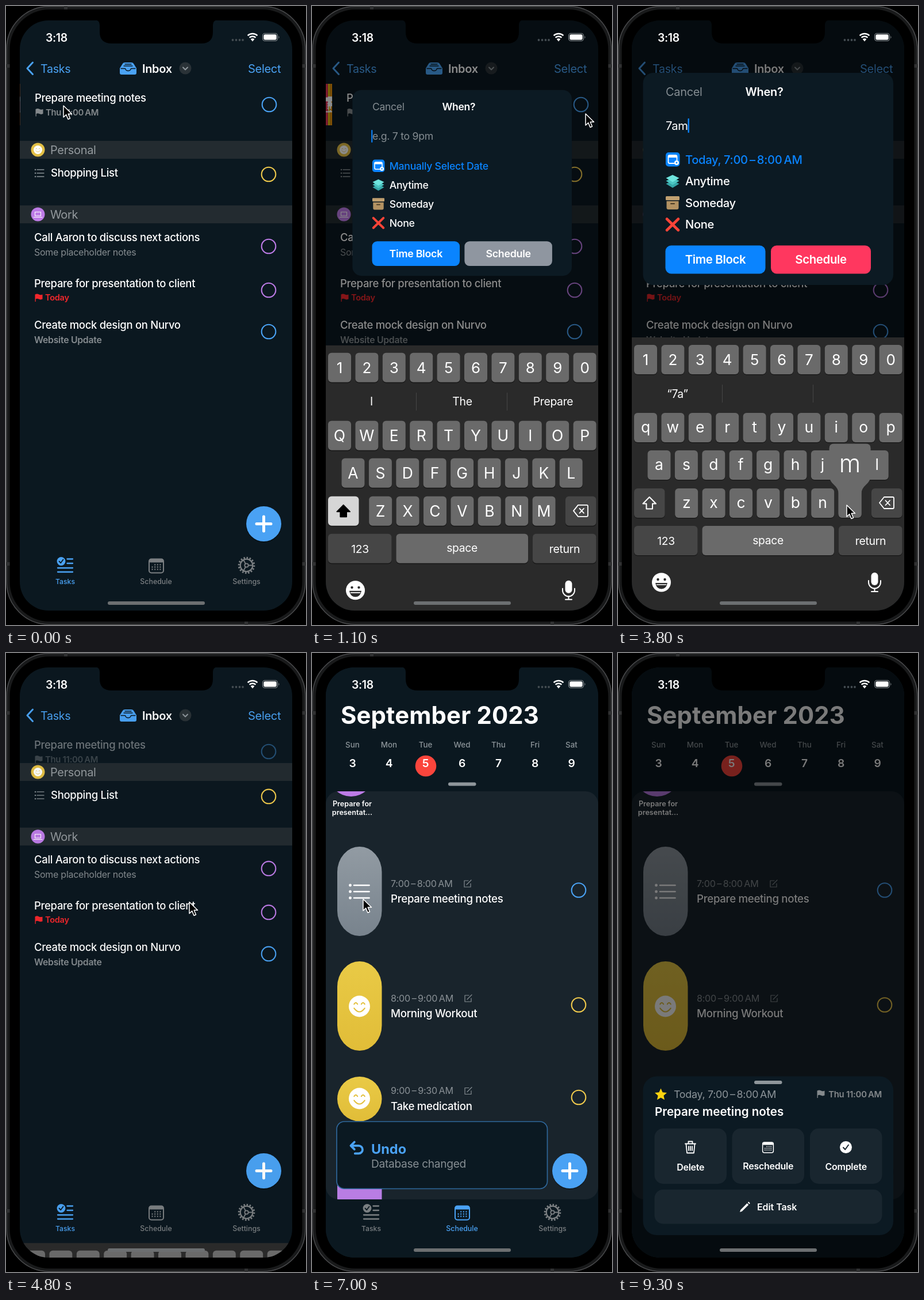
An HTML page for the animation above (9.8 s loop, 522 by 1074 pixels).

```html
<!DOCTYPE html>
<html lang="en">
<head>
<meta charset="utf-8">
<title>Scheduling a task</title>
<style>
html, body { margin: 0; width: 100%; height: 100%; overflow: hidden; background: #000; }
svg { display: block; width: 100vw; height: 100vh; }
text { font-family: Inter, "Open Sans", sans-serif; white-space: pre; }
</style>
</head>
<body>
<svg id="stage" viewBox="0 0 522 1074"></svg>
<script>
const LOOP = 9800;
const BG = '#0b1820', BLUE = '#4aa2f4', IOS = '#0a84ff', YELLOW = '#f0ca4c', PURPLE = '#bd7be6',
  RED = '#f3272c', DIM = '#7b7f82';

// Text is placed by the middle of its capital letters.
const T = (x, y, s, size, fill = '#fff', weight = 400, anchor = 'start', ls = -.017, id = '') =>
  `<text ${id && `id="${id}"`} x="${x}" y="${(y + size * .364).toFixed(2)}" font-size="${size}" fill="${fill}" font-weight="${weight}" text-anchor="${anchor}" letter-spacing="${(ls * size).toFixed(2)}">${s}</text>`;
const R = (x, y, w, h, r, fill, more = '') =>
  `<rect x="${x}" y="${y}" width="${w}" height="${h}" rx="${r}" fill="${fill}" ${more}/>`;
const C = (x, y, r, fill, more = '') => `<circle cx="${x}" cy="${y}" r="${r}" fill="${fill}" ${more}/>`;
const L = (d, color, w = 2, more = '') =>
  `<path d="${d}" fill="none" stroke="${color}" stroke-width="${w}" stroke-linecap="round" stroke-linejoin="round" ${more}/>`;
const P = (d, fill) => `<path d="${d}" fill="${fill}"/>`;
const G = (id, s, more = '') => `<g id="${id}" ${more}>${s}</g>`;
const at = (x, y, s, k = 1) => `<g transform="translate(${x} ${y}) scale(${k})">${s}</g>`;

const ring = (x, y, color) => C(x, y, 12.3, 'none', `stroke="${color}" stroke-width="2.1"`);
const flag = (x, y, color) => at(x, y, P('M-6.5-5.5Q-3-7.5 0-5.8T6.5-5.5V2.6Q3 4.2 0 2.6T-5.2 2.6V7H-6.5Z', color));
const bullets = (x, y, w, gap, color, sw) => [-1, 0, 1].map(i =>
  C(x, y + i * gap, sw * .9, color) + L(`M${x + w * .2} ${y + i * gap}H${x + w}`, color, sw)).join('');
const smiley = (x, y, r, ink) => at(x, y, C(0, 0, 1, '#fff') +
  L('M-.5-.2Q-.34-.48-.18-.2M.18-.2Q.34-.48.5-.2M-.5.18Q0 .85.5.18', ink, .11), r);
const calendar = color => {
  let dots = '';
  for (let n = 1; n < 12; n++) dots += C((n % 4) * 4.6 - 6.9, Math.floor(n / 4) * 4 - 1.5, 1.15, color);
  return R(-12.5, -11.5, 25, 24, 4, 'none', `stroke="${color}" stroke-width="2"`) + R(-12.5, -11.5, 25, 6, 2, color) + dots;
};
const undo = L('M-4-10L-10-4L-4 2M-10-4H3A6.5 6.5 0 0 1 3 9H-3', BLUE, 3.6);
const pencil = color => P('M-9 9L-7.8 5.2L3.6-6.2L6.2-3.6L-5.2 7.8ZM4.8-7.4L6.3-8.9L8.9-6.3L7.4-4.8Z', color);

const frame = R(0, 0, 522, 1074, 0, '#000') +
  R(1, .8, 520, 1072.4, 74, '#191a1b', 'stroke="#4a4b4d" stroke-width="1.5"') +
  R(6.5, 6, 509, 1062, 69, '#000') +
  [104, 968].map(y => R(0, y - 3, 6.5, 6, 0, '#303132') + R(515.5, y - 3, 6.5, 6, 0, '#303132')).join('') +
  R(101, 0, 6, 6, 0, '#303132') + R(415, 1068, 6, 6, 0, '#303132');

const statusBar = P('M155 24Q163 25 163 33V45Q163 65 184 65H340Q360 65 360 45V33Q360 25 368 24Z', '#000') +
  T(69, 54.5, '3:18', 19.4, '#fff', 600) +
  [394.5, 400.5, 406.5, 412].map(x => C(x, 59, 1.9, '#454d52')).join('') +
  P('M429 61.5L425.7 57.6A5 5 0 0 1 432.3 57.6Z', '#fff') +
  L('M423.6 54.8A8 8 0 0 1 434.4 54.8M420.6 51.3A12.4 12.4 0 0 1 437.4 51.3', '#fff', 2.5, 'style="stroke-linecap:butt"') +
  R(446.5, 47.5, 26, 13, 4, 'none', 'stroke="#8a9094" stroke-width="1.1"') +
  R(448.3, 49.3, 22.4, 9.4, 2.6, '#fff') + P('M474.5 52Q476.5 54 474.5 56.5Z', '#8a9094');

// Inbox
const band = (y, name, icon, color) => R(24, y, 474, 31, 0, '#232b30') + C(55.5, y + 15.5, 12, color) + icon +
  T(77, y + 16, name, 20, '#949a9e');
const task = (y, name, sub) => T(49, y, name, 18.5, '#fff', 500) + sub;
const inboxHead = L('M46.5 98L37 108.3L46.5 118.5', BLUE, 3) + T(60, 108.5, 'Tasks', 19.7, BLUE) +
  P('M198 108L203 100Q204 98 207 98H218Q221 98 222 100L227 108V116Q227 119 224 119H201Q198 119 198 116Z', BLUE) +
  L('M200 108.5H207.5Q208.5 112.5 212.5 112.5T217.5 108.5H225M205 104H220M207 101H218', BG, 1.3) +
  T(237, 108.5, 'Inbox', 20, '#fff', 600) + C(312, 108, 10.5, '#2a3237') + L('M308 106.5L312 110.5L316 106.5', '#8f979c', 2) +
  T(421, 108.5, 'Select', 20.1, BLUE);
const firstRow = G('buttons',
  `<rect id="b2" y="135" height="72" fill="#e58e0a"/><rect id="b1" y="135" height="72" fill="#e5c00c"/>` +
  G('i2', L('M0 160V176', '#fff', 2) + C(0, 182, 1.4, '#fff')) +
  G('i1', P('M-7 157H7L5 160V167Q9 170 10 174H1L0 186L-1 174H-10Q-9 170-5 167V160Z', '#fff')) +
  `<rect id="b0" x="24" y="135" height="72" fill="#e53156"/>` +
  G('i0', at(0, 171, calendar('#fff')))) +
  G('row', R(24, 135, 474, 72, 0, BG) + task(159, 'Prepare meeting notes',
    flag(57, 184.5, '#84898c') + T(68, 184.7, 'Thu 11:00\u2009AM', 14.8, '#84898c', 600)) + ring(457, 171, BLUE));
const rest = band(234, 'Personal', smiley(55.5, 249.5, 7.5, '#e3bf45'), '#e3bf45') +
  bullets(51, 290, 15, 6, '#8b9297', 1.3) + T(78, 289, 'Shopping List', 18.5, '#fff', 500) + ring(457, 292, YELLOW) +
  band(346, 'Work', L('M50.5 357.5H60.5V364H50.5ZM48 366.5H63', '#fff', 1.1), PURPLE) +
  task(401, 'Call Aaron to discuss next actions', T(49, 427, 'Some placeholder notes', 16, '#868c90')) + ring(457, 417, PURPLE) +
  task(481, 'Prepare for presentation to client', flag(57, 506, RED) + T(68, 506, 'Today', 14.5, RED, 600)) + ring(457, 493, PURPLE) +
  task(553, 'Create mock design on Nurvo', T(49, 579, 'Website Update', 15.8, '#868c90', 600)) + ring(457, 565, BLUE);
const inbox = G('inbox', inboxHead + G('first', firstRow) + G('rest', rest));

// Schedule
const edit = (x, y) => L(`M${x + 1} ${y - 5}H${x - 6}V${y + 6}H${x + 5}V${y}M${x - 2} ${y + 2}L${x + 6} ${y - 6}`, '#858d92', 1.2);
const slot = (y, h, fill, icon, ty, time, name, color) => R(44, y, 77.5, h, 38.7, fill, 'ry="44"') + icon +
  T(137, ty, time, 16.2, '#8a9196') + edit(time[0] === '7' ? 271 : 272, ty) +
  T(137, ty + 26.5, name, 18.7, '#fff', 500) + ring(464, ty + 11.5, color);
const days = ['Sun', 'Mon', 'Tue', 'Wed', 'Thu', 'Fri', 'Sat'].map((d, i) => {
  const x = 70.5 + i * 63.5;
  return (i === 2 ? C(x + .5, 196, 18.3, '#fb453c') : '') + T(x, 159.5, d, 13.4, '#8c9499', 500, 'middle', 0) +
    T(x, 191, i + 3, 19.3, '#fff', 600, 'middle');
}).join('');
const schedule = G('schedule', R(24, 25, 474, 1024, 0, BG) + T(50, 108, 'September 2023', 41.8, '#fff', 700, 'start', .004) + days +
  R(237, 224.5, 48.5, 6, 3, '#8f969b') + R(24, 240, 474, 708, 22, '#19242c') +
  `<g clip-path="url(#panel)">` + C(68, 210, 39, PURPLE) +
  T(70, 261.5, 'Prepare for', 12.6, '#fff', 600, 'middle', 0) + T(70, 276, 'presentat…', 12.6, '#fff', 600, 'middle', 0) +
  slot(336, 155, 'url(#slate)', bullets(66.5, 414, 33, 11, '#fff', 2.7), 400, '7:00\u2009–\u20098:00\u2009AM', 'Prepare meeting notes', BLUE) +
  slot(535, 155, 'url(#gold)', smiley(82.5, 613, 18.5, '#e3c03c'), 599, '8:00\u2009–\u20099:00\u2009AM', 'Morning Workout', YELLOW) +
  slot(735, 77.5, 'url(#gold)', smiley(82.5, 773, 18.5, '#e3c03c'), 759.5, '9:00\u2009–\u20099:30\u2009AM', 'Take medication', YELLOW) +
  R(44, 856, 77.5, 155, 38.7, '#b97de4') + '</g>');

const tabs = G('tabTasks', C(96, 963.5, 7.4, 'currentColor') + L('M92.5 963.5L95.3 966.3L99.5 960.5', BG, 1.8) +
    L('M106.5 959.5H116M106.5 967H116M90 975H116M90 982H116', 'currentColor', 2.3) +
    T(103, 998.5, 'Tasks', 12.2, 'currentColor', 500, 'middle', 0)) +
  G('tabPlan', at(261.5, 971, calendar('currentColor')) + T(261, 998.5, 'Schedule', 12.4, 'currentColor', 500, 'middle', 0)) +
  `<g color="${DIM}">` + C(418.5, 970.5, 13.3, 'none', 'stroke="currentColor" stroke-width="3" pathLength="32" stroke-dasharray="1 1"') +
  C(418.5, 970.5, 10.8, 'none', 'stroke="currentColor" stroke-width="2.2"') + C(418.5, 970.5, 3.2, 'none', 'stroke="currentColor" stroke-width="1.8"') +
  L('M421.7 970.5H429M416.9 967.7L413.3 961.4M416.9 973.3L413.3 979.6', 'currentColor', 1.8) +
  T(418.5, 998.5, 'Settings', 12.4, 'currentColor', 500, 'middle', 0) + '</g>';
const plus = C(448.5, 900, 31, '#000', 'opacity=".25"') + C(448.5, 898.5, 30.5, BLUE) + L('M436 898.5H461M448.5 886V911', '#fff', 5);
const toast = G('toast', R(43, 813, 366.5, 116.5, 13, '#0b1922', 'stroke="#2e679b" stroke-width="1.7"') +
  at(78, 859, undo, 1.05) + T(103, 860, 'Undo', 23.5, BLUE, 700, 'start', 0) + T(103, 886, 'Database changed', 19.2, '#868e93'));

// Time picker
const option = (y, name, icon) => icon + T(117, y, name, 20.2, '#fff', 500);
const picker = G('picker', R(43.5, 116, 435.5, 368, 18, '#0c1a23') + T(83, 148.5, 'Cancel', 20, '#858d92') + T(254.5, 148.5, 'When?', 20, '#fff', 600, 'middle') +
  T(83, 207.5, '', 20.2, '#fff', 400, 'start', -.017, 'entry') + R(81, 195, 2.4, 25, 1, IOS, 'id="caret"') +
  R(83, 254, 24.5, 24.5, 5, IOS) + R(87.5, 259, 15, 14, 2.5, 'none', 'stroke="#fff" stroke-width="1.8"') + R(87.5, 259, 15, 4, 1, '#fff') + C(102, 272, 4, '#fff') + C(102, 272, 1.4, IOS) +
  T(117, 266.5, '', 20.2, IOS, 500, 'start', -.017, 'date') +
  option(304, 'Anytime', ['#35a7a8', '#4cc5c2', '#6ee4dd'].map((c, i) => P(`M95 ${303 - i * 5}L106.5 ${308.5 - i * 5}L95 ${315.5 - i * 5}L83.5 ${308.5 - i * 5}Z`, c)).join('')) +
  option(341.5, 'Someday', R(83, 330, 24, 7, 1.5, '#c0a070') + P('M84.5 338.5H105.5V350Q105.5 353 102.5 353H87.5Q84.5 353 84.5 350Z', '#b39262') + L('M92 343H98', '#4a3b24', 2)) +
  option(379, 'None', L('M85 369.5L105 389M105 369.5L85 389', '#fb4438', 4.6)) +
  R(82.5, 415.5, 174, 49, 10, IOS) + T(169.5, 440, 'Time Block', 20.4, '#fff', 600, 'middle') +
  R(266, 415.5, 174, 49, 10, '#8f96a0', 'id="confirm"') + T(353, 440, 'Schedule', 20.4, '#fff', 600, 'middle'));

// Keyboard
const PITCH = 47.4;
const cap = (x, y, w, fill = '#6a6a6a') => R(x, y + 1.3, w, 51, 6, '#171717') + R(x, y, w, 51, 6, fill);
const rows = [['1234567890', 28, 588], ['QWERTYUIOP', 28, 706], ['ASDFGHJKL', 51.5, 771], ['ZXCVBNM', 99.2, 837]];
const eachKey = f => rows.map(([s, x, y]) => [...s].map((c, i) => f(c, x + i * PITCH, y)).join('')).join('');
const letters = (id, f, dy) => G(id, eachKey((c, x, y) => y > 600 ? T(x + 20, y + 26 + dy, f(c), 26.5, '#fff', 400, 'middle', 0) : ''));
const keyboard = G('keyboard', R(24, 575, 474, 474, 0, '#2a2a2a') +
  eachKey((c, x, y) => cap(x, y, 40) + (y < 600 ? T(x + 20, y + 26, c, 26, '#fff', 400, 'middle', 0) : '')) +
  letters('upper', c => c, 0) + letters('lower', c => c.toLowerCase(), -2) +
  R(181, 657, 1, 31, 0, '#454545') + R(339, 657, 1, 31, 0, '#454545') +
  [103.5, 261.5, 419.5].map((x, i) => T(x, 672.5, '', 19.4, '#fff', 400, 'middle', -.017, 'hint' + i)).join('') +
  R(28, 838.3, 53.5, 51, 6, '#171717') + R(28, 837, 53.5, 51, 6, '#464646', 'id="shift"') +
  L('M54.7 852L66 863.5H60V872.5H49.4V863.5H43.4Z', '#fff', 2, 'id="arrow"') + cap(441, 837, 53.5, '#464646') +
  L('M463 852H478Q480 852 480 854V870Q480 872 478 872H463L455 862ZM465.5 858L473 866M473 858L465.5 866', '#fff', 1.8) +
  cap(28, 902, 110.5, '#464646') + cap(146.5, 902, 229.5) + cap(384, 902, 110.5, '#464646') +
  T(83.5, 928, '123', 19.3, '#fff', 400, 'middle') + T(261, 926.5, 'space', 19.3, '#fff', 400, 'middle') + T(439.5, 928, 'return', 19.5, '#fff', 400, 'middle') +
  C(75.5, 1000, 16.5, '#fff') + C(69.5, 995, 2.2, '#2a2a2a') + C(81.5, 995, 2.2, '#2a2a2a') + P('M65 1001H86Q84 1011.5 75.5 1011.5T65 1001Z', '#2a2a2a') + L('M67.5 1004H83.5', '#fff', 1.6) +
  R(440.5, 983, 12, 22, 6, '#fff') + L('M436 997V1000A10.5 10.5 0 0 0 457 1000V997M446.5 1011V1016M441 1016H452', '#fff', 2) +
  G('callout', P('M-28-78H28Q36-78 36-70V-22Q36-14 28-7Q20 0 20 8V43Q20 50 14 50H-14Q-20 50-20 43V8Q-20 0-28-7Q-36-14-36-22V-70Q-36-78-28-78Z', '#6a6a6a') +
    T(0, -44, '', 43, '#fff', 300, 'middle', 0, 'calloutText')));

// Task sheet
const tile = (x, name, y) => R(x, 825, 125.5, 96, 15, '#19262f') + T(x + 62.7, y, name, 16, '#fff', 600, 'middle');
const sheet = G('sheet', R(43.5, 734.5, 435.5, 275.5, 24, '#0c1a23') + R(237, 742, 48.5, 6, 3, '#8f969b') +
  P('M74.5 755.5L77.6 762.3L85 763L79.4 768L81 775.3L74.5 771.5L68 775.3L69.6 768L64 763L71.4 762.3Z', '#fdd30f') +
  T(97, 765.5, 'Today, 7:00\u2009–\u20098:00\u2009AM', 17.9, '#8d959a') + flag(353, 765, '#84898c') + T(459, 765.3, 'Thu 11:00\u2009AM', 14.9, '#84898c', 600, 'end') +
  T(64, 795, 'Prepare meeting notes', 20.6, '#fff', 600, 'start', -.002) +
  tile(63.5, 'Delete', 892) + tile(198.5, 'Reschedule', 890) + tile(334, 'Complete', 891) +
  L('M117 851.5H135M122.5 851V847.5H129.5V851M118.5 852L120 867.5H132L133.5 852M123 856V863M126 856V863M129 856V863', '#fff', 1.8) +
  at(261, 857.5, calendar('#fff'), .75) + C(396.5, 857.5, 10.5, '#fff') + L('M392 858L395.3 861.5L401 853.5', '#19262f', 2) +
  R(63.5, 931, 396, 59.5, 15, '#19262f') + at(221, 961, pencil('#fff')) + T(242, 961, 'Edit Task', 16, '#fff', 600, 'start', -.005));

const grad = (id, a, b) => `<linearGradient id="${id}" x2="0" y2="1"><stop stop-color="${a}"/><stop offset="1" stop-color="${b}"/></linearGradient>`;
document.getElementById('stage').innerHTML =
  `<defs>${grad('slate', '#929ba3', '#78838d')}${grad('gold', '#e9ca46', '#e1bd38')}` +
  `<clipPath id="screen">${R(24, 25, 474, 1024, 50, '#000')}</clipPath><clipPath id="panel">${R(24, 240, 474, 708, 22, '#000')}</clipPath></defs>` +
  frame + `<g clip-path="url(#screen)">` + R(24, 25, 474, 1024, 0, BG) + inbox + schedule + tabs + toast + plus +
  R(24, 1032, 474, 17, 0, '#000', 'id="gap"') +
  R(24, 25, 474, 1024, 0, '#000', 'id="shade"') + picker + keyboard + sheet + '</g>' + statusBar +
  R(177, 1033, 169, 6, 3, '#6c6f71') +
  G('cursor', `<path d="M0 0V20L4.7 15.6L8 23.5L11.5 22L8.2 14.2H14.5Z" fill="#000" stroke="#fff" stroke-width="1.5" stroke-linejoin="round"/>`);

const el = {};
document.querySelectorAll('[id]').forEach(e => el[e.id] = e);
const set = (id, a) => { for (const k in a) el[id].setAttribute(k, a[k]); };
const show = (id, on) => set(id, { display: on ? 'inline' : 'none' });
const move = (id, x, y = 0) => set(id, { transform: `translate(${x} ${y})` });
const write = (id, s) => { if (el[id].textContent !== s) el[id].textContent = s; };
const span = (t, from, len) => Math.min(1, Math.max(0, (t - from) / len));
const out = (t, from, len) => 1 - (1 - span(t, from, len)) ** 3;
const smooth = p => p * p * (3 - 2 * p);

const path = [[0, 100, 173], [650, 465, 170], [950, 465, 170], [1150, 478, 190], [1900, 309, 652], [2350, 326, 612], [2650, 326, 612],
  [3120, 64, 800], [3320, 64, 800], [3720, 398, 866], [3920, 398, 866], [4400, 319, 432], [5150, 319, 432], [5900, 256, 973],
  [6300, 256, 973], [6950, 89, 427], [8400, 89, 427], [8900, 140, -30]];
function pointer(t) {
  let i = 1;
  while (i < path.length - 1 && path[i][0] < t) i++;
  const [a, b] = [path[i - 1], path[i]], p = smooth(span(t, a[0], b[0] - a[0]));
  return [a[1] + (b[1] - a[1]) * p, a[2] + (b[2] - a[2]) * p];
}
const presses = [[2450, '7', 332.4, 588], [3150, 'a', 71.5, 771], [3750, 'm', 403.6, 837]];

function draw(t) {
  const [cx, cy] = pointer(t);
  move('cursor', cx, cy);

  // Row swipe
  const back = out(t, 800, 435), w = t < 1300 ? (cx - 99) * (1 - back) : 0, third = w / 3;
  const wide = t < 800 ? smooth(span(t, 330, 120)) : (1 - back) ** 3;
  const x1 = 24 + third, x2 = x1 + third;
  set('buttons', { opacity: Math.min(1, w / 3) });
  set('b0', { width: third + (w - third) * wide });
  set('b1', { x: x1, width: third });
  set('b2', { x: x2, width: third });
  move('i0', 24 + Math.min(34, third * .36));
  move('i1', x1 + Math.min(32, third * .24));
  move('i2', x2 + Math.min(32, third * .21));
  move('row', w);

  // Picker and keyboard
  const kb = out(t, 800, 435) - smooth(span(t, 4500, 350));
  const gone = smooth(span(t, 4500, 250));
  const size = out(t, 860, 480) * (1 - .7 * gone), drop = 474 * (1 - kb);
  show('picker', t > 860 && t < 4750);
  set('picker', { opacity: 1 - gone, transform: `translate(261 ${300 + drop / 2}) scale(${size}) translate(-261 -300)` });
  show('keyboard', kb > 0);
  move('keyboard', 0, drop);

  const typed = presses.filter(p => t >= p[0]).map(p => p[1]).join('');
  const hinted = presses.filter(p => t >= p[0] + 130).map(p => p[1]).join('');
  write('entry', typed || 'e.g. 7 to 9pm');
  set('entry', { fill: typed ? '#fff' : '#858d92' });
  set('caret', { x: typed ? 83 + el.entry.getComputedTextLength() : 81 });
  write('date', typed ? 'Today, 7:00\u2009–\u20098:00\u2009AM' : 'Manually Select Date');
  set('confirm', { fill: typed ? '#ff375f' : '#8f96a0' });
  show('upper', !typed);
  show('lower', typed);
  set('shift', { fill: typed ? '#464646' : '#d6d6d6' });
  set('arrow', { stroke: typed ? '#fff' : '#000', fill: typed ? 'none' : '#000' });
  (hinted ? [`“${hinted}”`, '', ''] : ['I', 'The', 'Prepare']).forEach((s, i) => write('hint' + i, s));
  const hit = presses.find(p => t >= p[0] && t < p[0] + 160);
  show('callout', hit);
  if (hit) {
    move('callout', hit[2], hit[3] + .5);
    write('calloutText', hit[1]);
  }

  // List closes up, then the toast comes in
  const close = smooth(span(t, 4620, 320));
  set('first', { opacity: 1 - close });
  move('rest', 0, -72 * close);
  show('toast', t > 4800 && t < 7600);
  move('toast', -400 * (1 - out(t, 4800, 500)));
  show('gap', t > 4850 && t < 5300);

  // Schedule tab and task sheet
  const plan = t >= 6200, up = out(t, 7500, 500);
  show('inbox', !plan);
  show('schedule', plan);
  set('tabTasks', { color: plan ? DIM : BLUE });
  set('tabPlan', { color: plan ? BLUE : DIM });
  show('sheet', up > 0);
  move('sheet', 0, 330 * (1 - up));
  set('shade', { opacity: .52 * (out(t, 860, 480) - smooth(span(t, 4500, 350)) + up) });
}

const start = performance.now();
function tick() {
  draw((performance.now() - start) % LOOP);
  requestAnimationFrame(tick);
}
draw(0);
requestAnimationFrame(tick);
</script>
</body>
</html>
```
